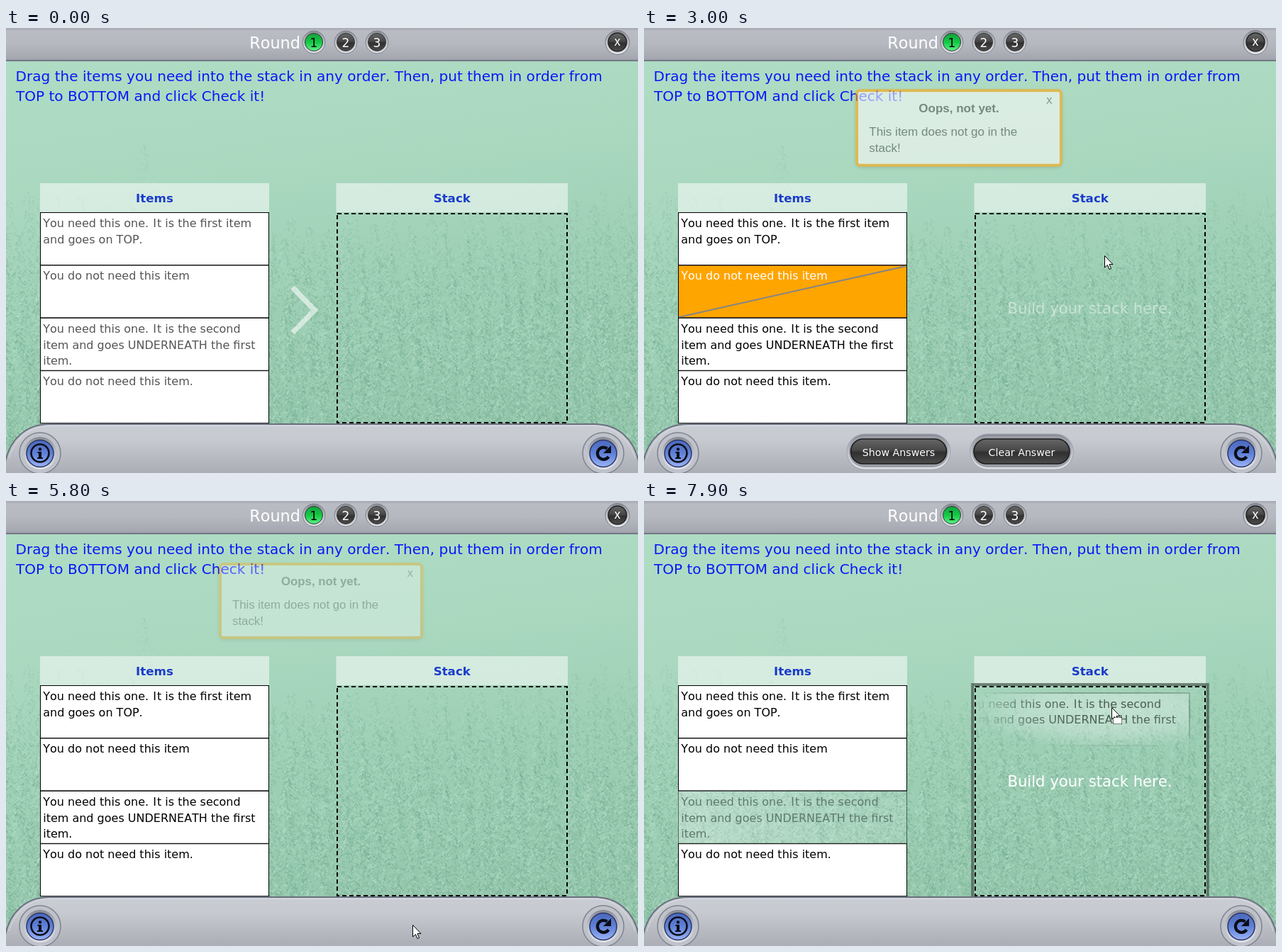
Animation, 891 px wide and 628 px high, one loop 8000 ms. Source, as an HTML page with a canvas:

```html
<!DOCTYPE html>
<html lang="en">
<head>
<meta charset="utf-8">
<title>Stack activity</title>
<style>
html, body { margin: 0; width: 100%; height: 100%; overflow: hidden; background: #aedbc3; }
canvas, svg { position: absolute; left: 0; top: 0; width: 891px; height: 628px; }
text { font-family: "DejaVu Sans", sans-serif; font-kerning: none; }
.ui { font-family: "Liberation Sans", Arial, sans-serif; font-kerning: auto; }
.x { font-family: "Open Sans", sans-serif; font-weight: 600; }
</style>
</head>
<body>
<canvas id="wood" width="891" height="628"></canvas>
<svg id="stage" viewBox="0 0 891 628"></svg>
<script>
const W = 891, H = 628, LOOP = 8000;
const clamp = v => Math.max(0, Math.min(1, v));

// ---- forest backdrop ----
let seed = 7;
const rnd = () => (seed = (seed * 16807) % 2147483647) / 2147483647;

// snowy on the left of the trunk, shaded on the right
function tree(c, x, top, h, a) {
  for (let y = 0; y < h; y += 3) {
    const w = 1.5 + y * 0.2 + (y % 9) * 0.4;
    for (let k = 0; k < 4; k++) {
      const d = (rnd() * 2 - 1) * w, s = d < 0 ? -1 : 1;
      const shade = rnd() < (d > 0 ? 0.72 : 0.38);
      c.strokeStyle = shade ? `rgba(114,170,143,${a})` : `rgba(186,226,205,${a})`;
      c.beginPath();
      c.moveTo(x + d, top + y);
      c.lineTo(x + d + s * (1 + rnd() * 2.5), top + y + 1 + rnd() * 3);
      c.stroke();
    }
  }
}

function forest() {
  const c = document.getElementById('wood').getContext('2d');
  const g = c.createLinearGradient(0, 47, 70, H);
  g.addColorStop(0, '#afdcc4');
  g.addColorStop(0.35, '#a9d8bf');
  g.addColorStop(0.65, '#9dcfb4');
  g.addColorStop(1, '#94c6ab');
  c.fillStyle = g;
  c.fillRect(0, 0, W, H);
  c.lineWidth = 1.1;
  tree(c, 193, 166, 90, 0.13);
  for (let row = 0; row < 13; row++) {
    for (let x = -10; x < W + 10; x += 25) {
      const px = x + rnd() * 16;
      const top = 222 + row * 28 + rnd() * 26 + 45 * (1 - Math.abs(px - 445) / 445);
      tree(c, px, top, 84, 0.1 + 0.36 * clamp((top - 215) / 160));
    }
  }
}

// ---- markup helpers ----
const text = (x, y, s, size, attrs = '') =>
  `<text x="${x}" y="${y}" font-size="${size}" ${attrs}>${s}</text>`;
const mid = 'text-anchor="middle"';
const rect = (x, y, w, h, attrs) => `<rect x="${x}" y="${y}" width="${w}" height="${h}" ${attrs}/>`;
const circle = (x, y, r, attrs) => `<circle cx="${x}" cy="${y}" r="${r}" ${attrs}/>`;
const grad = (id, ...stops) => `<linearGradient id="${id}" x2="0" y2="1">` +
  stops.map(([o, c]) => `<stop offset="${o}" stop-color="${c}"/>`).join('') + '</linearGradient>';

const items = [
  ['You need this one. It is the first item', 'and goes on TOP.'],
  ['You do not need this item'],
  ['You need this one. It is the second', 'item and goes UNDERNEATH the first', 'item.'],
  ['You do not need this item.']
];
const ITEM_X = 48.5, ITEM_W = 322, ITEM_H = 74;
const itemY = i => 260.5 + i * 74.4;
// the capital I is set a little wider
const wideI = s => s.replace('It ', '<tspan dx="1">I</tspan><tspan dx="1">t</tspan> ');
const lines = list => list.map((s, i) => text(3.7, 20.5 + i * 22.8, wideI(s), 16)).join('');

const item = (list, i) => `<g id="item${i}" transform="translate(${ITEM_X} ${itemY(i)})">
  ${rect(0, 0, ITEM_W, ITEM_H, 'class="bg" fill="#fff" stroke="#000"')}
  <path class="strike" d="M1 ${ITEM_H - 1}L${ITEM_W - 1} 1" stroke="#858585" stroke-width="2"/>
  <g class="txt">${lines(list)}</g></g>`;

const grabs = { 1: [230, 36], 2: [212, 20] };
const ghost = i => {
  const [x, y] = grabs[i];
  return `<radialGradient id="fade${i}" gradientUnits="userSpaceOnUse" cx="0" cy="0" r="1"
      gradientTransform="translate(${x} ${y + 4}) scale(205 56)">
      <stop offset="0" stop-color="#fff" stop-opacity=".75"/>
      <stop offset=".55" stop-color="#fff" stop-opacity=".55"/>
      <stop offset="1" stop-color="#fff" stop-opacity="0"/></radialGradient>
    <mask id="mask${i}" maskUnits="userSpaceOnUse" x="-2" y="-2" width="330" height="80">
      ${rect(-2, -2, 330, 80, `fill="url(#fade${i})"`)}</mask>
    <g id="ghost${i}" mask="url(#mask${i})">
      ${rect(0, 0, ITEM_W, ITEM_H, 'fill="#fff" fill-opacity=".5" stroke="#222"')}
      <g fill="#222">${lines(items[i])}</g></g>`;
};

const knob = (x, n, on) => circle(x, 20, 16, 'fill="url(#rim)" stroke="#80838c"') +
  circle(x, 20, 12.5, `fill="url(#${on ? 'green' : 'dark'})" stroke="#333"`) +
  text(x, 27, n, 17, `${mid} fill="${on ? '#000' : '#fff'}"`);

const pill = (id, cx, label) => `<g id="${id}">
  ${rect(cx - 73, 573, 146, 50, 'rx="25" fill="url(#rim)" stroke="#a0a3ab"')}
  ${rect(cx - 70, 576, 140, 44, 'rx="22" fill="#9b9ea6"')}
  ${rect(cx - 67.5, 580, 135, 35, 'class="face" rx="17.5" fill="url(#dark)" stroke="#1c1c1c" stroke-width="1.5"')}
  ${text(cx, 604, label, 14.2, mid + ' fill="#fff"')}</g>`;

const blue = (x, icon) => circle(x, 600, 29, 'fill="#bfc2ca" stroke="#80848e" stroke-width="1.5"') +
  circle(x, 600, 23, 'fill="url(#rim)"') +
  circle(x, 600.5, 19, 'fill="url(#blue)" stroke="#2b3566" stroke-width="1.5"') +
  `<g transform="translate(${x} 600)">${icon}</g>`;

const cursors = `<g id="cursor" stroke="#000" fill="#fff">
  <path id="arrow" d="M0 0V16.5L4 13L6.5 19L9 18L6.5 12H11.5Z"/>
  ${rect(2, 14, 12, 9, 'id="parcel" stroke-dasharray="1 1" shape-rendering="crispEdges"')}
  <path id="move" d="M0-11L4-7H1.5V-1.5H7V-4L11 0L7 4V1.5H1.5V7H4L0 11L-4 7H-1.5V1.5H-7V4L-11 0L-7-4V-1.5H-1.5V-7H-4Z"/>
  <path id="hand" d="M-1.5 1Q0-1 1.5 1V7L9 9Q11 10 10.5 14L8.5 21H0L-5 13Q-6 10-3.5 10.5L-1.5 12Z"/>
  <g id="no" transform="translate(12 -7)" fill="none">
    <path d="M-5.3-5.3L5.3 5.3" stroke="#fff" stroke-width="4.5"/>
    ${circle(0, 0, 7.5, 'stroke="#fff" stroke-width="4.5"')}
    ${circle(0, 0, 7.5, 'stroke-width="2.2"')}
    <path d="M-5.3-5.3L5.3 5.3" stroke-width="2.2"/></g></g>`;

const popup = `<g id="popup">
  ${rect(302, 91, 284, 104, 'rx="5" fill="#000" opacity=".35" filter="url(#soft)"')}
  ${rect(302, 89, 284, 104, 'rx="4" fill="#fafafa" stroke="#ffa50a" stroke-width="4"')}
  <g fill="#555">
  ${text(444, 119, 'Oops, not yet.', 16.8, 'class="ui" font-weight="bold" ' + mid)}
  ${text(319, 151.5, 'This item does not go in the', 16.8, 'class="ui"')}
  ${text(319, 175, 'stack!', 16.8, 'class="ui"')}
  ${text(569.7, 107, 'X', 13, 'class="x" fill="#777" ' + mid)}</g></g>`;

const heading = (x, w, s) => rect(x, 219, w, 41, 'fill="#fff" fill-opacity=".53"') +
  text(x + w / 2, 245.5, s, 16.7, mid + ' font-weight="bold" fill="#1a3ccb"');

const bar = 'M-1 630V612C6 580 28 559 62 559H829C863 559 885 580 892 612V630Z';

forest();
const svg = document.getElementById('stage');
svg.innerHTML = `<defs>
  ${grad('top', [0, '#a6a8b2'], [0.1, '#babcc4'], [0.5, '#b6b8c0'], [0.92, '#a5a8b0'], [1, '#989ba4'])}
  ${grad('base', [0, '#c9ccd4'], [0.3, '#c8cad1'], [1, '#a9acb4'])}
  ${grad('rim', [0, '#878a93'], [0.45, '#bcbfc6'], [1, '#e2e4e9'])}
  ${grad('dark', [0, '#666'], [0.45, '#484848'], [0.55, '#303030'], [1, '#4c4c4c'])}
  ${grad('green', [0, '#12a23a'], [0.5, '#13c946'], [1, '#5cf286'])}
  ${grad('blue', [0, '#4b69bd'], [0.5, '#5f80d6'], [1, '#9ab3f5'])}
  <linearGradient id="pale"><stop stop-color="#fff" stop-opacity=".32"/>
    <stop offset="1" stop-color="#fff" stop-opacity=".1"/></linearGradient>
  <filter id="soft" x="-10%" y="-20%" width="120%" height="140%"><feGaussianBlur stdDeviation="3"/></filter>
  </defs>
  ${rect(0, 0, W, 46, 'fill="url(#top)"')}
  ${rect(0, 45, W, 2, 'fill="#747986"')}
  ${text(343.3, 29, 'Round', 22.3, 'fill="#fff"')}
  ${knob(434, 1, true)}${knob(479, 2)}${knob(523, 3)}
  ${circle(862, 20.5, 17, 'fill="url(#rim)" stroke="#7b7e87"')}
  ${circle(862, 20, 13, 'fill="url(#dark)" stroke="#222" stroke-width="1.5"')}
  ${text(862, 25, 'X', 13.5, 'class="x" fill="#fff" ' + mid)}
  <g fill="#0a18fa">
  ${text(13.6, 74.5, 'Drag the items you need into the stack in any order. Then, put them in order from', 20.06)}
  ${text(14, 103, 'TOP to BOTTOM and click Check it!', 20.06)}</g>
  ${heading(48, 323, 'Items')}${heading(465.5, 326.5, 'Stack')}
  <path id="chevron" d="M404 366L435 398L404 430" fill="none" stroke="#fff" stroke-opacity=".58" stroke-width="7.5"/>
  ${items.map(item).join('')}
  ${rect(463.2, 259, 331.6, 302, 'id="ring" fill="none" stroke="#3f5048" stroke-opacity=".68" stroke-width="4"')}
  ${rect(467, 262, 324, 295, 'fill="none" stroke="#000" stroke-width="2" stroke-dasharray="6 4"')}
  <path id="solid" d="M467.5 558V262.5H790.5V558" fill="none" stroke="#000" stroke-width="3"/>
  ${text(628.5, 403, 'Build your stack here.', 21.2, 'id="hint" fill="#fff" ' + mid)}
  <path d="${bar}" fill="url(#base)" stroke="#6c7180" stroke-width="2"/>
  <path d="M4 607C13 580 32 561.5 62 561.5H829C859 561.5 878 580 887 607" fill="none" stroke="#e3e5ea" stroke-opacity=".7"/>
  ${blue(48, circle(0, 0, 12.5, 'fill="none" stroke="#0b0d18" stroke-width="2.6"') +
    circle(0, -5.6, 2.2, 'fill="#0b0d18"') +
    '<path d="M-3.5-2H2V6H4V8H-4V6H-2V0H-3.5Z" fill="#0b0d18"/>')}
  ${blue(842, '<path d="M5.5-6.5A8.5 8.5 0 1 0 7.5 5" fill="none" stroke="#0b0d18" stroke-width="4.2"/>' +
    '<path d="M11-11V0H0Z" fill="#0b0d18"/>')}
  <g id="buttons">${pill('show', 359, 'Show Answers')}${pill('clear', 532.5, 'Clear Answer')}</g>
  ${ghost(1)}${ghost(2)}${popup}${cursors}`;

// ---- motion ----
const $ = s => svg.querySelector(s);
const show = (id, on) => $('#' + id).setAttribute('display', on ? 'inline' : 'none');
const set = (s, name, v) => $(s).setAttribute(name, v);

// pointer path: time, x, y
const path = [
  [900, 290, 622], [1100, 289, 536], [1400, 262, 390], [1600, 272, 372], [1800, 272, 372],
  [1900, 279, 371], [2100, 390, 355], [2300, 520, 330], [2500, 615, 322], [2700, 649, 321],
  [4600, 649, 321], [4700, 609, 452], [4900, 582, 560], [5100, 574, 592], [5300, 573, 598],
  [6200, 573, 598], [6300, 545, 590], [6500, 346, 540], [6600, 313, 512], [6900, 261, 430],
  [7100, 261, 430], [7200, 285, 426], [7400, 449, 388], [7600, 590, 318], [7800, 652, 293], [7900, 659, 291]
];
function pointer(t) {
  const i = path.findIndex(p => p[0] >= t);
  if (i < 1) return path[0].slice(1);
  const [a, b] = [path[i - 1], path[i]], k = (t - a[0]) / (b[0] - a[0]);
  return [a[1] + (b[1] - a[1]) * k, a[2] + (b[2] - a[2]) * k];
}

function draw(t) {
  const [x, y] = pointer(t);
  const first = t >= 1900 && t < 2700, second = t >= 7200, drag = first || second;
  const wrong = t >= 2700 && t < 5700;
  const held = first && t > 1900 ? 1 : second ? 2 : 0;

  items.forEach((_, i) => {
    const id = '#item' + i, bad = wrong && i === 1, lifted = i === held && held > 0;
    set(id + ' .bg', 'fill', bad ? '#ffa500' : lifted ? 'url(#pale)' : '#fff');
    set(id + ' .bg', 'stroke-opacity', lifted ? 0.5 : 1);
    set(id + ' .strike', 'display', bad ? 'inline' : 'none');
    set(id + ' .txt', 'fill', bad ? '#fff' : lifted ? '#5f7a6d' : t < 2000 ? '#555' : '#000');
  });
  for (const i of [1, 2]) {
    show('ghost' + i, held === i);
    set('#ghost' + i, 'transform', `translate(${x - grabs[i][0]} ${y - grabs[i][1]})`);
  }

  show('chevron', t < 2000);
  show('solid', drag && x >= 440 && x < 466);
  show('ring', drag && x >= 466);
  const appear = clamp((t - 2700) / 500);
  const hint = first ? clamp((t - 2100) / 400) : second ? clamp((t - 7300) / 400) : wrong ? 1 - clamp((t - 2700) / 550) : 0;
  set('#hint', 'opacity', hint);

  show('buttons', t >= 2800 && t < 5700);
  set('#clear .face', 'fill', t >= 5500 ? '#303030' : 'url(#dark)');
  set('#popup', 'opacity', t < 5600 ? appear : 1 - clamp((t - 5600) / 300));
  const s = 1 + 0.035 * (1 - appear);
  set('#popup', 'transform', `translate(444 141) scale(${s}) translate(-444 -141)`);

  const overItem = x > 48 && x < 371 && y > 260 && y < 558;
  const overButton = wrong && y > 578 && y < 616;
  const kind = drag ? (x > 300 && x < 466 ? 'no' : 'arrow') : overItem ? 'move' : overButton ? 'hand' : 'arrow';
  for (const k of ['arrow', 'move', 'hand', 'no']) show(k, k === kind);
  show('parcel', drag && kind === 'arrow');
  show('cursor', t >= 900);
  set('#cursor', 'transform', `translate(${Math.round(x) + 0.5} ${Math.round(y) + 0.5})`);
}

const start = performance.now();
function tick() {
  const t = (performance.now() - start) % LOOP;
  draw(Math.floor(t / 100) * 100);
  requestAnimationFrame(tick);
}
draw(0);
requestAnimationFrame(tick);
</script>
</body>
</html>
```
